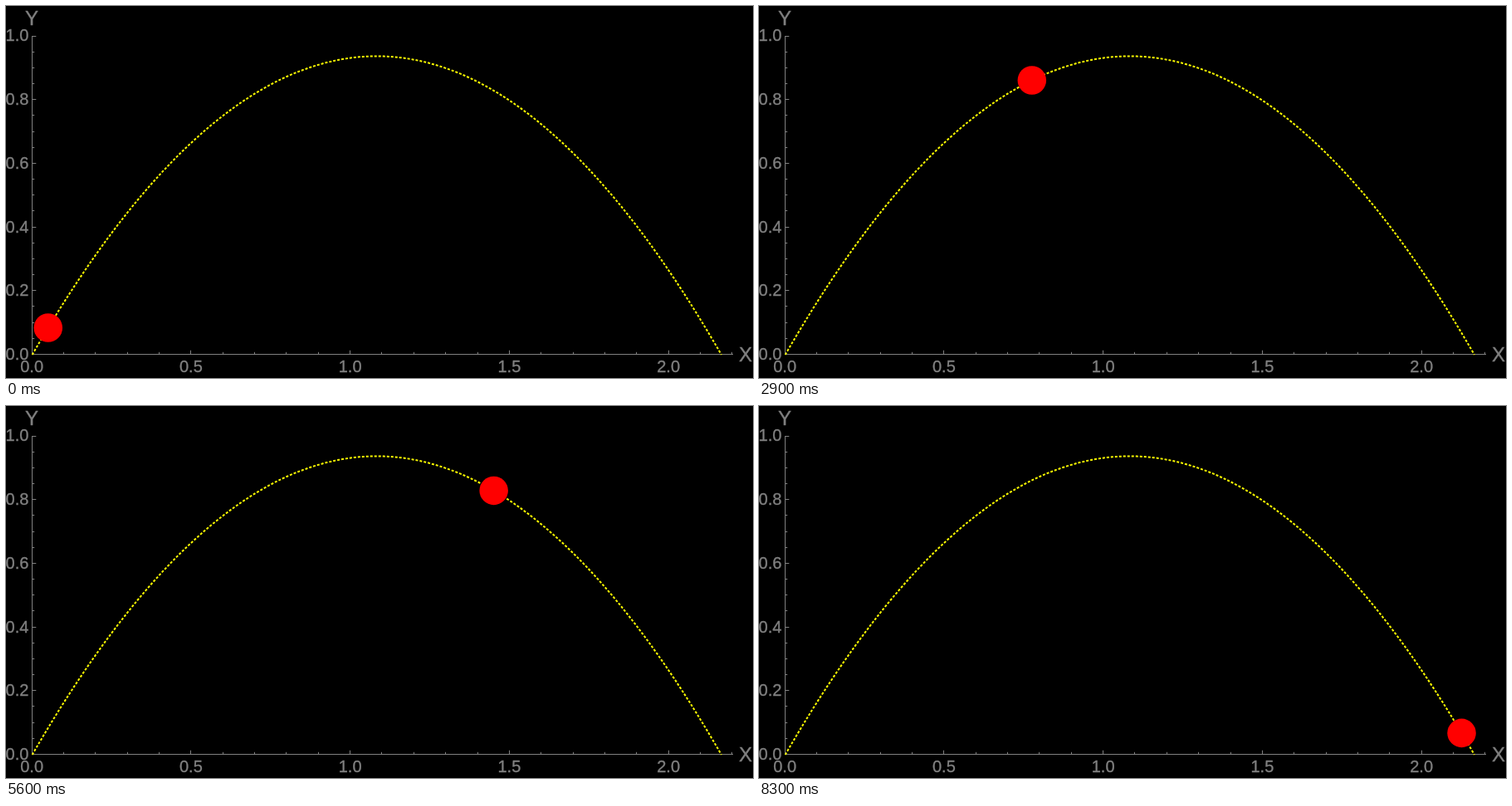
These frames come from a looping animation (900x448 px, 8400 ms). An HTML page with a canvas:

```html
<!DOCTYPE html>
<html lang="en">
<head>
<meta charset="utf-8">
<title>Projectile motion</title>
<style>
html, body { margin: 0; width: 100%; height: 100%; overflow: hidden; background: #000; }
canvas { display: block; }
</style>
</head>
<body>
<canvas id="stage" width="900" height="448"></canvas>
<script>
const ctx = document.getElementById("stage").getContext("2d");
const FONT = '"Liberation Sans", Arial, sans-serif';
const GRAY = "#808080";
const SCALE = 383.5, LEFT = 31.6, BASE = 420;
const MAJOR = 4.3, MINOR = 2.2;
const RADIUS = 0.045 * SCALE;
const STEP = 100, STEPS = 84;

// Launch at 5 m/s, 60 degrees, with g = 10.
const VX = 2.5, VY = 5 * Math.sin(Math.PI / 3), G = 10;
const FLIGHT = 2 * VY / G;

const px = x => LEFT + x * SCALE;
const py = y => BASE - y * SCALE;
const position = t => [px(VX * t), py(VY * t - G * t * t / 2)];

// A hairline outline gives the labels a slightly heavier weight.
function label(text, x, y, size, align) {
  ctx.font = `${size}px ${FONT}`;
  ctx.textAlign = align;
  ctx.fillText(text, x, y);
  ctx.strokeText(text, x, y);
}

function drawAxes() {
  const bottom = 419, left = 31;
  ctx.fillStyle = ctx.strokeStyle = GRAY;
  ctx.lineWidth = 0.35;
  ctx.setLineDash([]);
  ctx.fillRect(left, bottom, 845, 1);
  ctx.fillRect(left, 36, 1, 384);

  for (let i = 0; i <= 22; i++) {
    const major = i % 5 === 0;
    const len = major ? MAJOR : MINOR;
    const x = px(i / 10) - 0.5;
    ctx.fillRect(Math.floor(x), bottom - len, 1, len);
    if (major) label((i / 10).toFixed(1), x, 441, 20, "center");
  }

  for (let i = 0; i <= 20; i++) {
    const major = i % 4 === 0;
    const y = py(i / 20) - 0.5;
    ctx.fillRect(left + 1, Math.floor(y), major ? MAJOR : MINOR, 1);
    if (major) label((i / 20).toFixed(1), 27.4, Math.round(y + 6.45), 20, "right");
  }

  label("X", 891, 428, 24, "center");
  label("Y", 31, 23, 24, "center");
}

function drawPath() {
  ctx.beginPath();
  for (let i = 0; i <= 200; i++) ctx.lineTo(...position(FLIGHT * i / 200));
  ctx.strokeStyle = "#ff0";
  ctx.lineWidth = 2;
  ctx.setLineDash([3, 2]);
  ctx.stroke();
}

function drawBall(t) {
  ctx.beginPath();
  ctx.arc(...position(t), RADIUS, 0, 2 * Math.PI);
  ctx.fillStyle = "#f00";
  ctx.fill();
}

function render(ms) {
  const step = Math.floor(ms / STEP) % STEPS;
  ctx.fillStyle = "#000";
  ctx.fillRect(0, 0, 900, 448);
  drawAxes();
  drawPath();
  drawBall(0.02 + step * 0.01);
}

const start = performance.now();
function tick() {
  render(performance.now() - start);
  requestAnimationFrame(tick);
}
tick();
</script>
</body>
</html>
```
